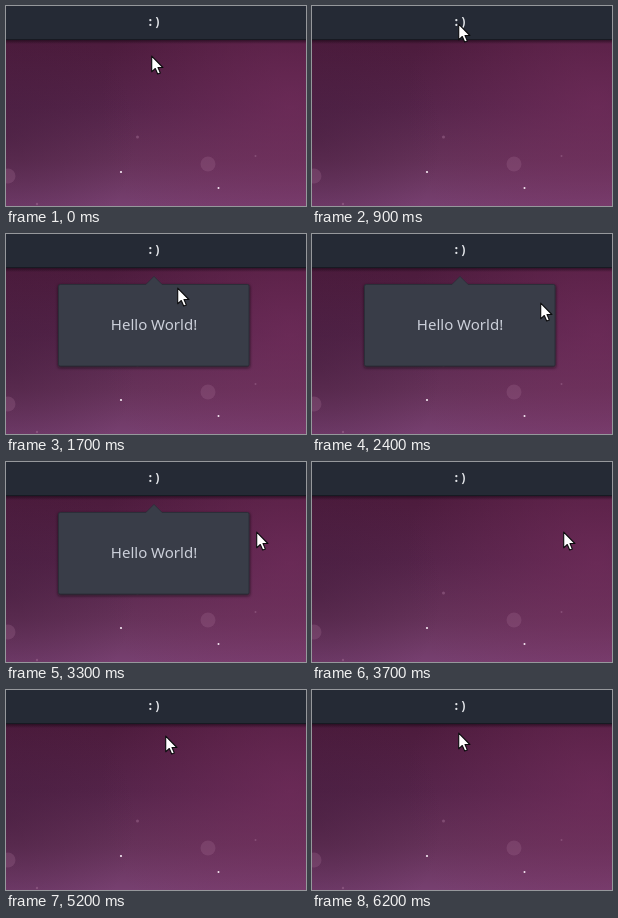
Write an HTML page that moves like this. It is 300 px wide and 200 px high and loops after 6.5 s.

```html
<!DOCTYPE html>
<html lang="en">
<head>
<meta charset="utf-8">
<title>Panel popup</title>
<style>
html, body { margin: 0; width: 100%; height: 100%; overflow: hidden; background: #55234a; }
#stage { position: absolute; left: 0; top: 0; width: 300px; height: 200px; overflow: hidden; }
#scene { position: absolute; left: 0; top: 0; display: block; }
.label { font: 700 12px "Noto Sans Mono", "DejaVu Sans Mono", monospace; fill: #e3e5e9; }
.hello { font: 400 15px "Noto Sans", "Open Sans", sans-serif; fill: #ccd0da; }
#popup { animation: popup 6500ms step-end infinite; }
#cursor {
  position: absolute; display: block; overflow: visible;
  animation: move 6500ms step-end infinite;
}
@keyframes popup {
  0% { visibility: hidden; }
  16.92% { visibility: visible; }
  56.92%, 100% { visibility: hidden; }
}
/* the pointer is redrawn every 100 ms while it moves */
@keyframes move {
  0% { left: 145px; top: 49px; }
  4.61% { left: 145px; top: 49px; animation-timing-function: steps(5, start); }
  12.3% { left: 146px; top: 20px; }
  13.84% { left: 146px; top: 20px; animation-timing-function: steps(1, start); }
  16.92% { left: 146px; top: 17px; animation-timing-function: steps(3, start); }
  21.53% { left: 150px; top: 27px; animation-timing-function: steps(4, start); }
  27.69% { left: 171px; top: 53px; animation-timing-function: steps(7, start); }
  38.46% { left: 228px; top: 68px; animation-timing-function: steps(3, start); }
  43.07% { left: 245px; top: 69px; }
  44.61% { left: 245px; top: 69px; animation-timing-function: steps(1, start); }
  50.76% { left: 248px; top: 69px; animation-timing-function: steps(1, start); }
  56.92% { left: 250px; top: 69px; animation-timing-function: steps(1, start); }
  64.61% { left: 251px; top: 69px; animation-timing-function: steps(2, start); }
  67.69% { left: 243px; top: 68px; animation-timing-function: steps(3, start); }
  72.3% { left: 203px; top: 58px; animation-timing-function: steps(2, start); }
  75.38% { left: 178px; top: 52px; animation-timing-function: steps(4, start); }
  81.53% { left: 159px; top: 45px; animation-timing-function: steps(1, start); }
  83.07% { left: 155px; top: 44px; }
  84.61% { left: 155px; top: 44px; animation-timing-function: steps(1, start); }
  87.69% { left: 152px; top: 43px; animation-timing-function: steps(1, start); }
  90.76% { left: 151px; top: 42px; animation-timing-function: steps(1, start); }
  93.84% { left: 149px; top: 42px; animation-timing-function: steps(2, start); }
  96.92%, 100% { left: 146px; top: 42px; }
}
</style>
</head>
<body>
<div id="stage">
  <svg id="scene" width="300" height="200" viewBox="0 0 300 200">
    <defs>
      <linearGradient id="sky" x1="0" y1="0" x2="0" y2="1">
        <stop offset="0.17" stop-color="#4c1b3c"/>
        <stop offset="0.5" stop-color="#55244a"/>
        <stop offset="0.78" stop-color="#653259"/>
        <stop offset="1" stop-color="#774070"/>
      </linearGradient>
      <radialGradient id="glow" gradientUnits="userSpaceOnUse" cx="285" cy="100" r="190">
        <stop offset="0" stop-color="#7a2f60" stop-opacity="0.55"/>
        <stop offset="1" stop-color="#7a2f60" stop-opacity="0"/>
      </radialGradient>
      <radialGradient id="shade" gradientUnits="userSpaceOnUse" cx="0" cy="130" r="130">
        <stop offset="0" stop-color="#3c1836" stop-opacity="0.4"/>
        <stop offset="1" stop-color="#3c1836" stop-opacity="0"/>
      </radialGradient>
      <linearGradient id="drop" x1="0" y1="0" x2="0" y2="1">
        <stop offset="0" stop-color="#120510" stop-opacity="0.55"/>
        <stop offset="1" stop-color="#120510" stop-opacity="0"/>
      </linearGradient>
      <filter id="blur" x="-10%" y="-10%" width="120%" height="120%">
        <feGaussianBlur stdDeviation="1.5"/>
      </filter>
    </defs>

    <rect width="300" height="200" fill="url(#sky)"/>
    <rect width="300" height="200" fill="url(#glow)"/>
    <rect width="300" height="200" fill="url(#shade)"/>

    <g fill="#b07aa0">
      <circle cx="202" cy="158" r="7.5" opacity="0.22"/>
      <circle cx="2" cy="170" r="7.5" opacity="0.24"/>
      <circle cx="131.500" cy="131" r="1.500" opacity="0.4"/>
      <circle cx="249.500" cy="150" r="1" opacity="0.4"/>
      <circle cx="31" cy="198" r="1.200" opacity="0.4"/>
    </g>
    <g fill="#f6eaf3">
      <circle cx="115" cy="166" r="1.100"/>
      <circle cx="212.500" cy="182" r="1"/>
    </g>

    <rect y="34" width="300" height="4" fill="url(#drop)"/>
    <rect width="300" height="33" fill="#252a35"/>
    <rect y="33" width="300" height="1" fill="#171a22"/>
    <text class="label" x="148" y="20" text-anchor="middle">:)</text>

    <g id="popup">
      <rect x="52" y="51" width="192" height="83" rx="2" fill="#0c0a10" opacity="0.6" filter="url(#blur)"/>
      <path d="M54.500 50.500H140L148 42.500L156 50.500H241.500Q243 50.500 243 52V130.500Q243 132 241.500 132H54Q52.500 132 52.500 130.500V52Q52.500 50.500 54.500 50.500Z"
            fill="#393d48" stroke="#2b2e38"/>
      <path d="M140 51L148 43L156 51Z" fill="#393d48"/>
      <text class="hello" x="148" y="96" text-anchor="middle">Hello World!</text>
    </g>
  </svg>

  <svg id="cursor" width="13" height="20" viewBox="0 0 13 20">
    <path d="M0.700 1.200V16.800L4.300 13.500L6.700 19L9.300 17.900L7 12.500H11.900Z"
          fill="#fff" stroke="#0b0b0d" stroke-width="1.100" stroke-linejoin="round"/>
  </svg>
</div>
</body>
</html>
```
